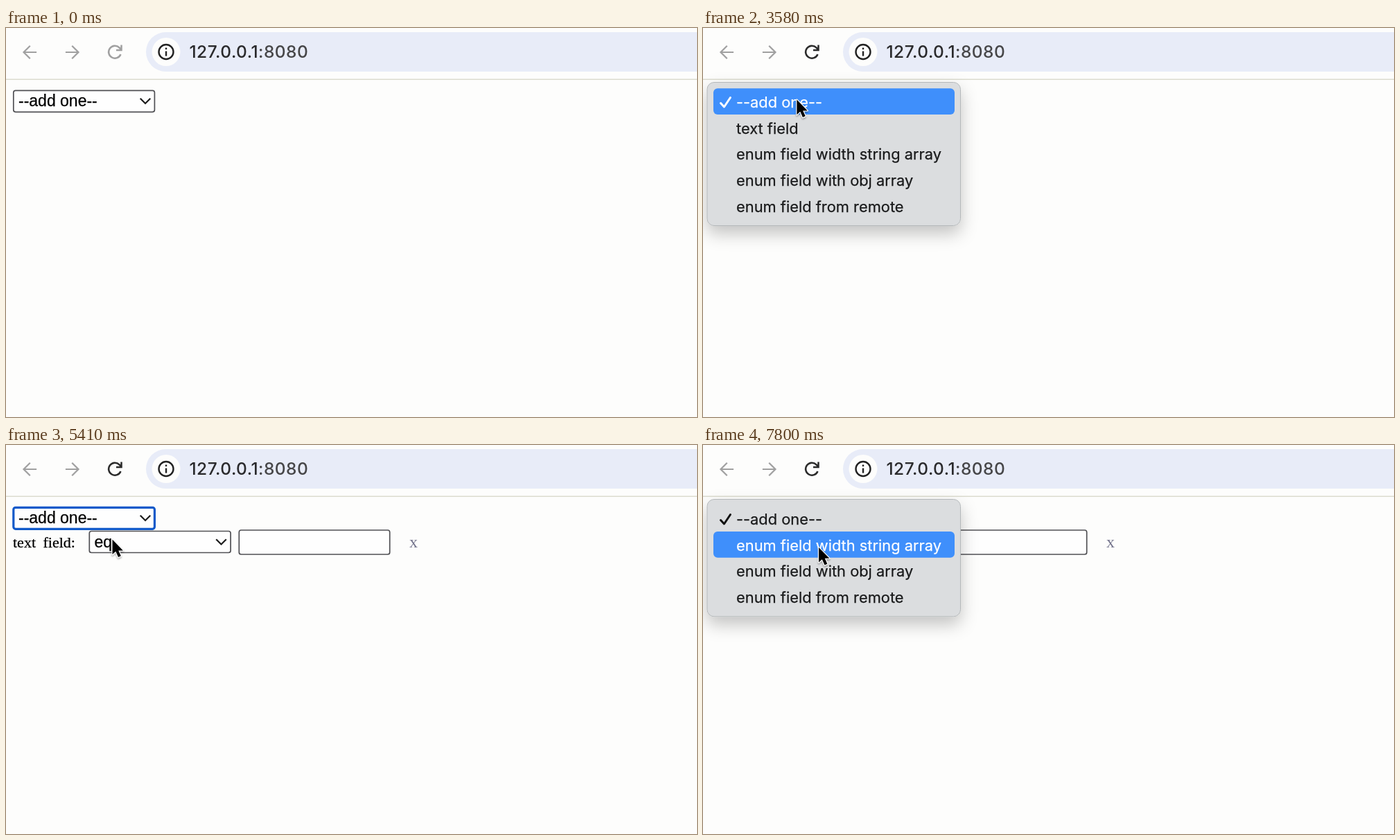
Recreate the animation shown at these times as an HTML page. Size 997 px wide and 562 px high, loop 8 s.

```html
<!DOCTYPE html>
<html lang="en">
<head>
<meta charset="utf-8">
<title>Add a filter field</title>
<style>
  html, body { margin: 0; width: 100%; height: 100%; overflow: hidden; background: #fdfdfc; }
  svg { display: block; width: 100%; height: 100%; }
  text { white-space: pre; }
  .line { fill: none; stroke-linecap: square; stroke-width: 2.2; }
  .url { font: 500 24.5px Inter, sans-serif; letter-spacing: .45px; fill: #2a2a2c; }
  .control { font: 23px "Liberation Sans", Arial, sans-serif; stroke: #000; stroke-width: .25; }
  .label { font: 22px "Liberation Serif", serif; word-spacing: 5px; stroke: #000; stroke-width: .25; }
  .remove { font: 24px "Liberation Serif", serif; fill: #74748c; }
  .box { fill: #fefefe; stroke: #505054; stroke-width: 1.7; }
  .item { font: 21.85px Inter, sans-serif; color: #191a1b; fill: currentColor; stroke: currentColor; stroke-width: .25; }
  .item.on { color: #fff; }
  .check { fill: none; stroke: #111; stroke-width: 3; stroke-linecap: round; stroke-linejoin: round; }
</style>
</head>
<body>
<svg viewBox="0 0 997 562">
  <defs>
    <filter id="menuShadow" x="-20%" y="-20%" width="140%" height="150%">
      <feDropShadow dx="0" dy="11" stdDeviation="12" flood-opacity=".23"/>
    </filter>
    <filter id="cursorShadow" x="-50%" y="-30%" width="200%" height="180%">
      <feDropShadow dx="0" dy="2" stdDeviation="1.5" flood-opacity=".35"/>
    </filter>
    <path id="chevron" class="line" stroke="#1c1c1c" d="M0 0l6.5 6.5l6.5 -6.5"/>
  </defs>
  <rect width="997" height="562" fill="#fdfdfc"/>

  <g class="line" stroke="#a0a0a0">
    <path d="M26 35H43M34 26.5L25.5 35L34 43.5"/>
    <path d="M87 35H104M96 26.5L104.5 35L96 43.5"/>
  </g>
  <path id="reload" class="line" style="stroke-width:2.5;stroke-linecap:butt" d="M165.5 38A9 9 0 1 1 163.5 28.3L166 31M166.5 24.5V32H159"/>
  <path d="M997 6H230.5a28.5 28.5 0 0 0 0 57H997Z" fill="#e8ecf8"/>
  <circle cx="231" cy="34.5" r="20.5" fill="#fdfdfc"/>
  <g fill="none" stroke="#222" stroke-width="2.4">
    <circle cx="231" cy="34.5" r="10.5"/>
    <path d="M231 33.5V40.5M231 28.5V31"/>
  </g>
  <text class="url" x="264.5" y="43">127.0.0.1<tspan fill="#464648">:8080</tspan></text>
  <path d="M0 74.3H997" stroke="#dcdccf" stroke-width="1.6"/>

  <rect id="picker" class="box" x="10.8" y="90.3" width="203.6" height="31" rx="3"/>
  <text class="control" x="18" y="113">--add one--</text>
  <use href="#chevron" x="194.5" y="102.5"/>

  <g id="row">
    <text class="label" x="10" y="148">text field:</text>
    <rect class="box" x="120.3" y="124.5" width="203.8" height="31" rx="3"/>
    <text class="control" x="127.5" y="148">eq</text>
    <use href="#chevron" x="304" y="137"/>
    <rect class="box" x="336.3" y="123" width="217.4" height="35" rx="3"/>
    <text class="remove" x="582" y="148">x</text>
  </g>

  <g id="menu">
    <rect id="panel" x="6" y="78.5" width="365.5" rx="10" fill="#dbdddf" stroke="#b4b8ba" filter="url(#menuShadow)"/>
    <rect id="highlight" x="15" width="348" height="37.7" rx="6" fill="#3f8ffb"/>
    <path id="check" class="check" d="M25.5 108.5L30.5 114L39.5 100.5"/>
    <g id="items"></g>
  </g>

  <g id="cursor">
    <path transform="scale(.88)" d="M0 0V24.5L5.5 19.5L9.7 29L14 27L10 18H17.5Z" fill="#000" stroke="#fff" stroke-width="2.6" stroke-linejoin="round" paint-order="stroke" filter="url(#cursorShadow)"/>
  </g>
</svg>
<script>
const LOOP = 8000, PITCH = 37.7, FIRST_ITEM = 87.3;
const OPTIONS = ['--add one--', 'text field', 'enum field width string array',
  'enum field with obj array', 'enum field from remote'];
const FOCUS = 1560, FIRST_OPEN = 2900, PICK = 5010, FADE = 5080, FADE_END = 5290, SECOND_OPEN = 6480;

// Cursor stops: time, x, y
const STOPS = [
  [20, 400, 562], [630, 190, 246], [810, 190, 246], [1130, 141, 90], [1600, 335, 17],
  [1700, 335, 17], [2300, 134, 102], [3460, 134, 102], [4210, 154, 125], [4310, 154, 125],
  [4530, 153, 134], [4780, 153, 134], [4860, 153, 138], [5350, 153, 138], [5810, 163, 108],
  [6320, 163, 107], [6680, 163, 107], [7420, 167, 140], [7520, 167, 140], [7800, 167, 148]
];

const $ = id => document.getElementById(id);
const show = (id, on) => $(id).style.display = on ? '' : 'none';
const set = (id, attrs) => Object.entries(attrs).forEach(([k, v]) => $(id).setAttribute(k, v));

function cursorAt(t) {
  const next = STOPS.findIndex(stop => stop[0] > t);
  if (next < 0) return STOPS.at(-1).slice(1);
  if (next === 0) return STOPS[0].slice(1);
  const [t0, x0, y0] = STOPS[next - 1], [t1, x1, y1] = STOPS[next];
  const u = (t - t0) / (t1 - t0), k = u * u * (3 - 2 * u);
  return [x0 + (x1 - x0) * k, y0 + (y1 - y0) * k];
}

let listed = 0;
function listOptions(options) {
  if (listed === options.length) return;
  listed = options.length;
  $('items').innerHTML = options.map((name, i) =>
    `<text class="item" x="48" y="${115 + i * PITCH}">${name}</text>`).join('');
  set('panel', { height: options.length * PITCH + 18.5 });
}

function drawMenu(t, y) {
  const first = t >= FIRST_OPEN && t < FADE_END;
  const open = first || t >= SECOND_OPEN;
  show('menu', open);
  if (!open) return;
  listOptions(first ? OPTIONS : OPTIONS.filter(name => name !== 'text field'));
  const hovered = Math.max(0, Math.min(listed - 1, Math.floor((y + 1.5 - FIRST_ITEM) / PITCH)));
  const blink = t >= PICK && t < PICK + 50;
  const active = blink ? -1 : hovered;
  show('highlight', !blink);
  set('highlight', { y: FIRST_ITEM + hovered * PITCH });
  [...$('items').children].forEach((item, i) => item.classList.toggle('on', i === active));
  $('check').style.stroke = active === 0 ? '#fff' : '#111';
  const fade = first ? (t - FADE) / (FADE_END - FADE) : 0;
  $('menu').style.opacity = 1 - Math.max(0, fade);
}

function draw(t) {
  const [x, y] = cursorAt(t), added = t >= FADE_END;
  show('cursor', t >= STOPS[0][0]);
  set('cursor', { transform: `translate(${x} ${y})` });
  set('reload', { stroke: t < FOCUS ? '#a0a0a0' : '#2b2b2b' });
  show('row', added);
  $('picker').style.cssText = added ? 'stroke:#1059c9;stroke-width:3.2' : '';
  drawMenu(t, y);
}

function tick() {
  draw(performance.now() % LOOP);
  requestAnimationFrame(tick);
}
tick();
</script>
</body>
</html>
```
